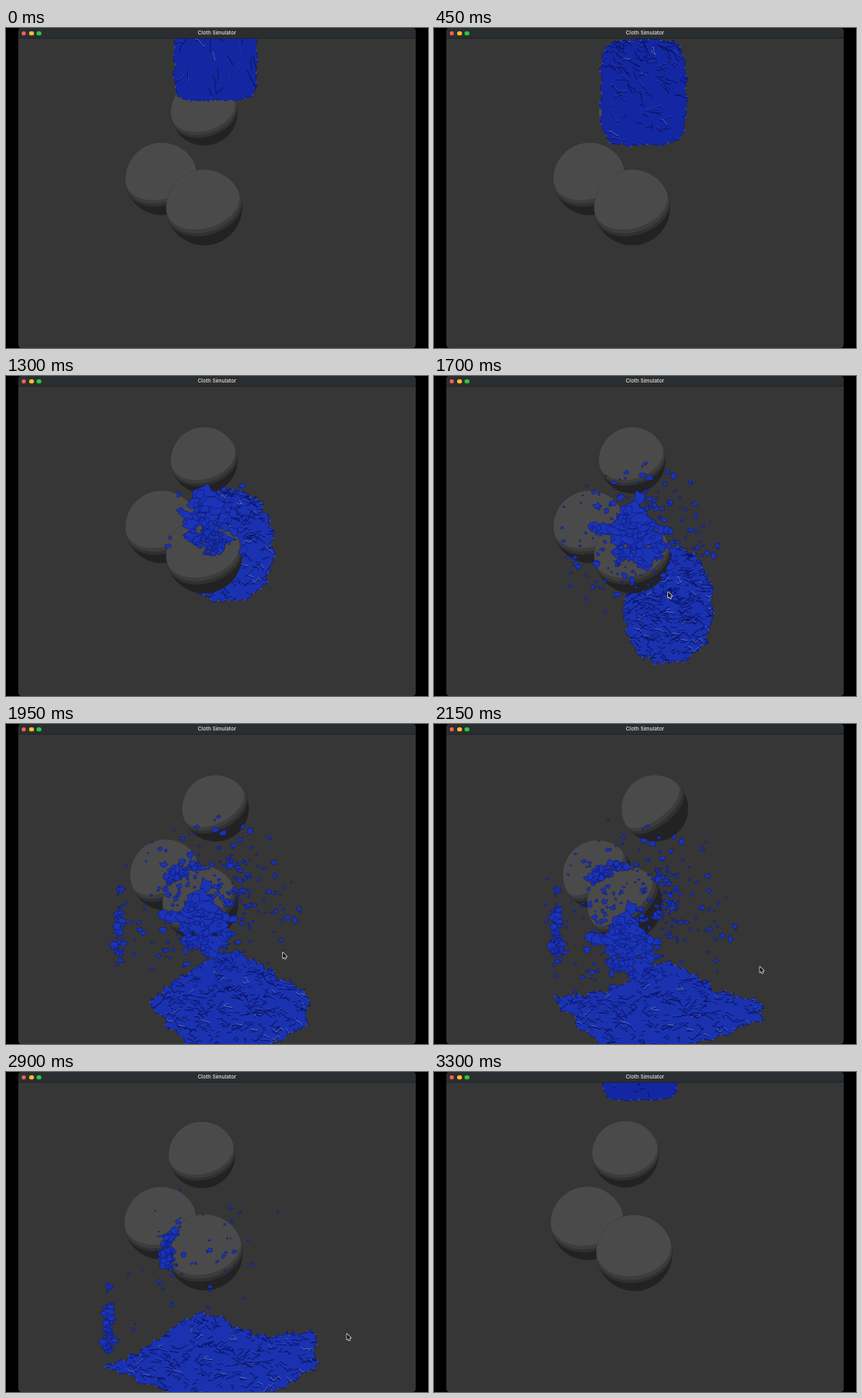
An HTML page with a canvas for the animation above (3350 ms loop, 512x389 px).

```html
<!DOCTYPE html>
<html lang="en">
<head>
<meta charset="utf-8">
<title>Cloth Simulator</title>
<style>
  html, body { margin: 0; width: 100%; height: 100%; overflow: hidden; background: #000; }
  canvas { position: absolute; left: 0; top: 0; width: 512px; height: 389px; }
  .bar {
    position: absolute; left: 15px; top: 0; width: 482px; height: 13px;
    box-sizing: border-box; background: #2b2e30; border-bottom: 1px solid #222425;
    border-radius: 4px 4px 0 0; color: #cfcfcf; text-align: center;
    font: 600 6.25px/13px Inter, "Liberation Sans", sans-serif;
  }
  .bar i { position: absolute; top: 3.6px; width: 5.8px; height: 5.8px; border-radius: 50%; }
</style>
</head>
<body>
<canvas id="stage"></canvas>
<div class="bar">
  <i style="left:3.5px;background:#ff5f57"></i>
  <i style="left:13px;background:#febc2e"></i>
  <i style="left:22.3px;background:#28c840"></i>
  Cloth Simulator
</div>
<script>
const LOOP = 3350, STEP = 50, RESET = 3150, TAU = Math.PI * 2, RING = 120;
const canvas = document.getElementById('stage');
const dpr = window.devicePixelRatio || 1;
canvas.width = 512 * dpr;
canvas.height = 389 * dpr;
const ctx = canvas.getContext('2d');
ctx.scale(dpr, dpr);
ctx.lineJoin = 'round';

function seeded(seed) {
  return () => {
    seed = (seed + 0x6D2B79F5) | 0;
    let v = Math.imul(seed ^ (seed >>> 15), 1 | seed);
    v = (v + Math.imul(v ^ (v >>> 7), 61 | v)) ^ v;
    return ((v ^ (v >>> 14)) >>> 0) / 4294967296;
  };
}
const rnd = seeded(41);
const bell = () => (rnd() + rnd() + rnd() - 1.5) * 1.5;
const noise = Array.from({ length: 512 }, () => rnd() * 2 - 1);
const mix = (a, b, k) => a + (b - a) * k;
const ramp = (a, b, t) => Math.max(0, Math.min(1, (t - a) / (b - a)));
const ease = (a, b, t) => { const k = ramp(a, b, t); return k * k * (3 - 2 * k); };

// 0 is the first camera angle, 1 the dragged one.
const turnAt = t => ease(1750, 2150, t) - 1.3 * ease(2600, 3000, t);

function sceneAt(t) {
  const k = turnAt(t), zoom = 1 + .04 * ease(2600, 3100, t);
  const ball = (x, y, r, dx, dr) => ({ x: x + dx * k, y: 170 + (y - 170) * zoom, r: r + dr * k });
  return {
    k,
    top: ball(240.5, 102.7, 40.4, 27.5, 0),
    left: ball(189, 183.5, 44, 9.5, -2),
    front: ball(240.5, 218.2, 46, -9, -.4),
    lean: .29 + .37 * k,
    tilt: .74 + .15 * k,
    wall: 120 + 22 * k
  };
}

function trace(points) {
  ctx.beginPath();
  points.forEach(([x, y]) => ctx.lineTo(x, y));
  ctx.closePath();
}

const ring = point => Array.from({ length: RING }, (_, i) => point(i / RING));

// Part of a ball whose normals face the light by more than c.
function cap({ x, y, r }, lean, s, c, color) {
  const lz = Math.sqrt(1 - s * s), q = Math.sqrt(1 - c * c);
  const ax = -Math.sin(lean), ay = -Math.cos(lean);
  trace(ring(f => {
    const cos = Math.cos(f * TAU);
    let u = c * s + q * lz * cos, v = q * Math.sin(f * TAU);
    if (c * lz < q * s * cos) {
      const d = Math.hypot(u, v);
      u /= d;
      v /= d;
    }
    return [x + r * (u * ax - v * ay), y + r * (u * ay + v * ax)];
  }));
  ctx.fillStyle = color;
  ctx.fill();
}

function sphere(ball, { lean, tilt }) {
  ctx.beginPath();
  ctx.arc(ball.x, ball.y, ball.r, 0, TAU);
  ctx.fillStyle = '#222';
  ctx.fill();
  cap(ball, lean, tilt, -.09, '#303030');
  cap(ball, lean, tilt, .03, '#3c3c3c');
  cap(ball, lean, tilt, .157, '#4a4a4a');
}

// Rounded block; a higher power gives squarer corners.
const block = (cx, cy, rx, ry, power) => ring(f => {
  const c = Math.cos(Math.PI + f * TAU), s = Math.sin(Math.PI + f * TAU);
  const r = (Math.abs(c) ** power + Math.abs(s) ** power) ** (-1 / power);
  return [cx + rx * r * c, cy + ry * r * s];
});

// Fluid resting on the floor: a mound along the back, straight edges in front.
function pool({ k, wall }) {
  const right = 376 + 20 * k, yl = 354 - 24 * k, yr = 317 + 20 * k;
  const front = [[right, yr], [right + 2, 362], [mix(320, 312, k), 391], [200, 391], [wall, yl]];
  return ring(f => {
    if (f < .5) {
      const w = f * 2, hump = 42 * Math.exp(-(((w - .46 - .1 * k) / .22) ** 2));
      return [mix(wall, right, w), mix(yl, yr, w) - hump];
    }
    const p = (f - .5) * 8, i = Math.floor(p), a = front[i], b = front[i + 1];
    return [mix(a[0], b[0], p - i), mix(a[1], b[1], p - i)];
  });
}

function mass(t, scene) {
  if (t >= RESET) return block(250, mix(-27, -6, ramp(RESET, 3300, t)), 45, 40, 6);
  const s = t / 1000, bottom = 88 + 109 * s + 26 * s * s;
  const late = ease(850, 1700, t), half = mix(64, 70, late);
  const falling = block(mix(254, 284, late), bottom - half, mix(50, 53, ramp(0, 850, t)), half,
    mix(7, 2.5, ramp(0, 900, t)));
  const spread = ease(1700, 2150, t);
  if (!spread) return falling;
  return pool(scene).map(([x, y], i) => [mix(falling[i][0], x, spread), mix(falling[i][1], y, spread)]);
}

const creases = Array.from({ length: 420 }, () => ({
  u: rnd(), v: rnd(), len: 4 + rnd() * 9, turn: bell() * .6, bend: bell() * 6, tone: rnd()
}));

function fluid(shape, t) {
  const calm = t >= RESET ? 0 : ramp(0, 1700, t);
  const rough = mix(1.2, 3.5, calm), upright = t >= RESET ? 0 : 1 - ramp(0, 700, t);
  const points = shape.map(([x, y], i) => [
    x + (noise[i] + Math.sin(t / 160 + i) * .3) * rough,
    y + (noise[i + 200] - Math.sin(t / 160 + i) * .3) * rough
  ]);
  const xs = shape.map(p => p[0]), ys = shape.map(p => p[1]);
  const x0 = Math.min(...xs), x1 = Math.max(...xs), y0 = Math.min(...ys), y1 = Math.max(...ys);

  trace(points);
  ctx.fillStyle = calm < .35 ? '#1427a2' : '#1a32b0';
  ctx.fill();
  ctx.save();
  ctx.clip();
  const bias = 1 + 1.2 * Math.sin(Math.PI * calm);
  for (const c of creases.slice(0, mix(40, 420, calm))) {
    const x = mix(x0, x1, c.u), y = mix(y0, y1, c.v ** bias), len = c.len * (1 + upright);
    const a = c.turn + upright * 1.4, ex = Math.cos(a) * len, ey = Math.sin(a) * len;
    const stroke = (dy, width, color) => {
      ctx.beginPath();
      ctx.moveTo(x, y + dy);
      ctx.bezierCurveTo(x + ex / 3, y + ey / 3 + c.bend + dy, x + ex / 1.5, y + ey / 1.5 - c.bend + dy,
        x + ex, y + ey + dy);
      ctx.lineWidth = width;
      ctx.strokeStyle = color;
      ctx.stroke();
    };
    stroke(0, 1.2, 'rgba(8,16,92,.75)');
    if (c.tone > .5) stroke(-1.2, .7, c.tone > .93 ? '#6f86dc' : '#2444c8');
  }
  ctx.restore();
  trace(points);
  ctx.lineWidth = .8;
  ctx.strokeStyle = '#0e1a76';
  ctx.stroke();
  ctx.setLineDash([3, 9, 2, 14]);
  ctx.strokeStyle = '#5069d6';
  ctx.stroke();
  ctx.setLineDash([]);
}

const drops = [];
function emit(count, from, to, size, makePath) {
  for (let i = 0; i < count; i++) {
    drops.push({
      from: from + rnd() * 250, to: to - (to < RESET ? rnd() * 300 : 0),
      size: size * (.35 + rnd() * rnd() * 1.3), wide: .8 + rnd() * .8,
      seed: Math.floor(rnd() * 500), path: makePath()
    });
  }
}

// Gush through the gap between the balls, then down as a column.
emit(130, 1150, 2500, 6.5, () => {
  const dx = bell(), dy = bell();
  return t => {
    const k = ease(1650, 2150, t);
    return [mix(246, 236, k) + dx * mix(27, 24, k),
      mix(170, 192, ramp(1200, 1700, t)) + 78 * k + 60 * ease(2150, 2600, t) + dy * 24];
  };
});
// Spray thrown outwards, then falling.
emit(170, 1200, 2600, 2.6, () => {
  const a = rnd() * TAU, d = 100 * Math.sqrt(rnd());
  return t => {
    const s = Math.max(0, t - 1700) / 1000, reach = d * (ease(1150, 1700, t) + .5 * s);
    return [248 + Math.cos(a) * reach, 200 + Math.sin(a) * reach + 55 * s + 70 * s * s];
  };
});
// Strand clinging to the left rim of the front ball and sliding down it.
emit(60, 1750, RESET, 4.2, () => {
  const da = bell() * .5, off = 1.02 + bell() * .08;
  return (t, { front }) => {
    const a = mix(4.3, 3.3, ramp(2150, 2700, t)) + da;
    return [front.x + Math.cos(a) * front.r * off, front.y + Math.sin(a) * front.r * off];
  };
});
// Drips off its right rim.
emit(65, 1750, 2800, 2.6, () => {
  const dx = bell() * 11, dy = bell() * 36;
  return t => [282 + dx, 220 + dy + 80 * (t - 2150) / 1000];
});
// Drops lying on its face.
emit(20, 1850, 3000, 2, () => {
  const a = rnd() * TAU, d = .8 * Math.sqrt(rnd());
  return (t, { front }) => [front.x + Math.cos(a) * d * front.r,
    front.y + Math.sin(a) * d * front.r + 25 * (t - 2150) / 1000];
});
// Splash running down the left wall.
emit(60, 1800, RESET, 3.4, () => {
  const dx = bell() * 5, dy = bell() * 34;
  return (t, { wall }) => [wall + 7 + dx, 250 + dy + 60 * ease(2100, 2750, t)];
});
// Last slow stragglers.
emit(40, 2000, RESET, 1.8, () => {
  const dx = bell() * 60, dy = bell() * 60;
  return t => [245 + dx, 200 + dy + 35 * (t - 2150) / 1000];
});

function drawDrop(d, t, scene) {
  if (t < d.from || t > d.to) return;
  const [x, y] = d.path(t, scene);
  if (y > 345) return;
  trace(Array.from({ length: 9 }, (_, i) => {
    const a = i * TAU / 9, r = d.size * (1 + noise[(d.seed + i) % 512] * .5);
    return [x + Math.cos(a) * r * d.wide, y + Math.sin(a) * r];
  }));
  ctx.fillStyle = '#1b34b6';
  ctx.fill();
  ctx.lineWidth = .6;
  ctx.strokeStyle = '#0d1872';
  ctx.stroke();
}

function drawCursor(t) {
  const k = ease(1650, 2400, t), back = ease(2700, 2950, t);
  const x = 282 + 153 * k - 24 * back, y = 262 + 33 * Math.min(1, k * 1.35) + 26 * back;
  trace([[0, 0], [0, 7], [1.6, 5.6], [2.7, 8], [3.8, 7.5], [2.8, 5.2], [5, 5]]
    .map(([dx, dy]) => [x + dx, y + dy]));
  ctx.lineWidth = 1.4;
  ctx.strokeStyle = '#e4e4e4';
  ctx.stroke();
  ctx.fillStyle = '#111';
  ctx.fill();
}

function drawWindow() {
  ctx.fillStyle = '#000';
  ctx.fillRect(0, 0, 512, 389);
  ctx.beginPath();
  ctx.roundRect(15.3, .3, 481.4, 388.4, 4);
  ctx.fillStyle = '#363636';
  ctx.fill();
  ctx.lineWidth = .6;
  ctx.strokeStyle = '#484848';
  ctx.stroke();
}

function draw(t) {
  const scene = sceneAt(t);
  drawWindow();
  sphere(scene.top, scene);
  fluid(mass(t, scene), t);
  sphere(scene.left, scene);
  sphere(scene.front, scene);
  if (t < RESET) drops.forEach(d => drawDrop(d, t, scene));
  if (t >= 1550 && t < RESET) drawCursor(t);
}

function tick() {
  draw(Math.floor(performance.now() % LOOP / STEP) * STEP);
  requestAnimationFrame(tick);
}
tick();
</script>
</body>
</html>
```
